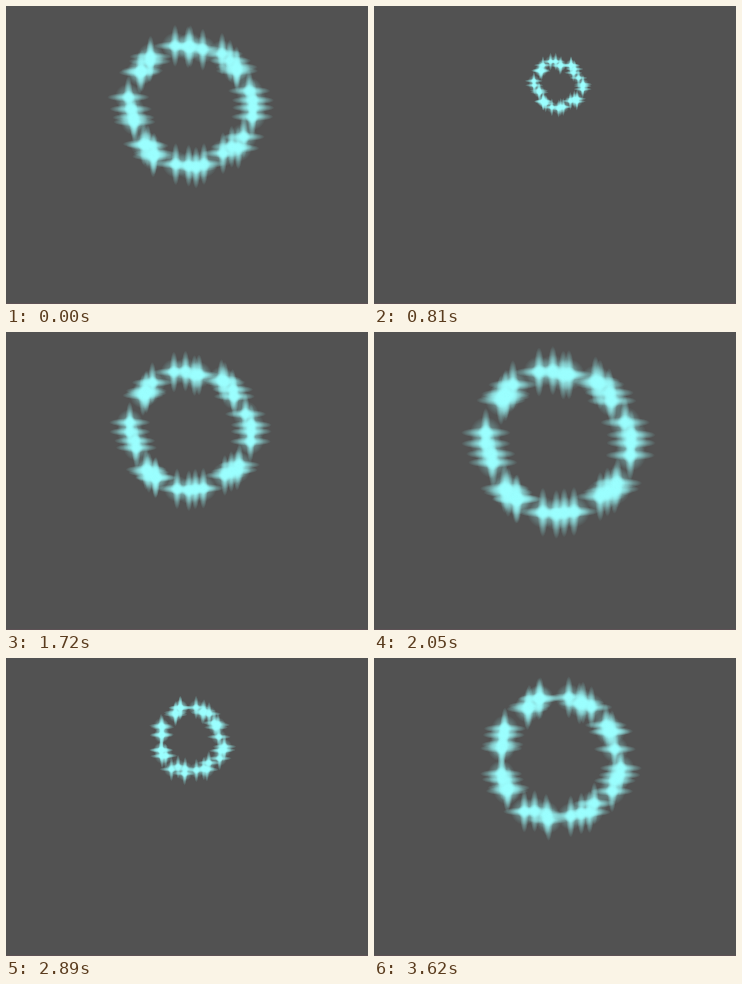
An HTML page with a canvas that plays this animation: 362 by 298 pixels, repeating every 3720 ms.

```html
<!DOCTYPE html>
<html lang="en">
<head>
<meta charset="utf-8">
<title>Sparkle rings</title>
<style>
  html, body { margin: 0; width: 100%; height: 100%; overflow: hidden; background: #525252; }
  canvas { display: block; width: 362px; height: 298px; }
</style>
</head>
<body>
<canvas id="stage" width="362" height="298"></canvas>
<script>
const LOOP = 3720;
const CLUSTERS = 8;
const PER_CLUSTER = 4;
const SCATTER = 3;
const ctx = document.getElementById('stage').getContext('2d');

// A burst is shown until `end`; its motion stops at `rest`.
const bursts = [
  { born: -1490, rest: 285, end: 285, turn: -2 },
  { born: 276, rest: 2050, end: 2260, turn: -2 },
  { born: 2130, rest: 3620, end: LOOP, turn: 20 }
];
bursts.forEach((burst, i) => { burst.sparks = scatter(burst.turn, i + 1); });

function seeded(seed) {
  return () => {
    seed = (seed * 16807) % 2147483647;
    return seed / 2147483647 * 2 - 1;
  };
}

// Clusters sit evenly around the ring; each spark starts slightly off centre.
function scatter(turn, seed) {
  const rand = seeded(seed * 7919);
  return Array.from({ length: CLUSTERS * PER_CLUSTER }, (_, i) => {
    const cluster = Math.floor(i / PER_CLUSTER);
    const place = i % PER_CLUSTER - (PER_CLUSTER - 1) / 2;
    const deg = turn + cluster * 360 / CLUSTERS + place * 7.5 + rand() * 3;
    const a = deg * Math.PI / 180;
    return { cos: Math.cos(a), sin: Math.sin(a), dx: rand() * SCATTER, dy: rand() * SCATTER };
  });
}

const SIZE = 64;
const sprite = makeSpark();

function makeSpark() {
  const c = document.createElement('canvas');
  c.width = c.height = SIZE * 2;
  const g = c.getContext('2d');
  const blob = (rx, ry, middle, alpha) => {
    const fill = g.createRadialGradient(0, 0, 0, 0, 0, 1);
    fill.addColorStop(0, `rgba(155,255,255,${alpha})`);
    fill.addColorStop(0.4, `rgba(155,255,255,${middle})`);
    fill.addColorStop(1, 'rgba(155,255,255,0)');
    g.setTransform(rx * SIZE, 0, 0, ry * SIZE, SIZE, SIZE);
    g.fillStyle = fill;
    g.fillRect(-1, -1, 2, 2);
  };
  blob(0.64, 0.64, 0.34, 0.65);
  blob(1, 0.21, 0.6, 1);
  blob(0.21, 1, 0.6, 1);
  blob(0.32, 0.32, 0.85, 1);
  return c;
}

function drawBurst(burst, t) {
  const age = Math.min(t, burst.rest) - burst.born;
  const radius = 0.0455 * age - 2.8e-6 * age * age - 1.5;
  const cy = 76 + 11e-6 * age * age;
  const arm = 2.5 + 0.0126 * age;
  for (const s of burst.sparks) {
    const x = 184.5 + s.dx + radius * s.cos;
    const y = cy + s.dy + radius * s.sin;
    ctx.drawImage(sprite, x - arm, y - arm, arm * 2, arm * 2);
  }
}

function frame() {
  const t = performance.now() % LOOP;
  ctx.fillStyle = '#525252';
  ctx.fillRect(0, 0, 362, 298);
  ctx.fillStyle = '#5e5256';
  ctx.fillRect(0, 297, 362, 1);
  drawBurst(bursts.find(b => t < b.end), t);
  requestAnimationFrame(frame);
}
frame();
</script>
</body>
</html>
```
